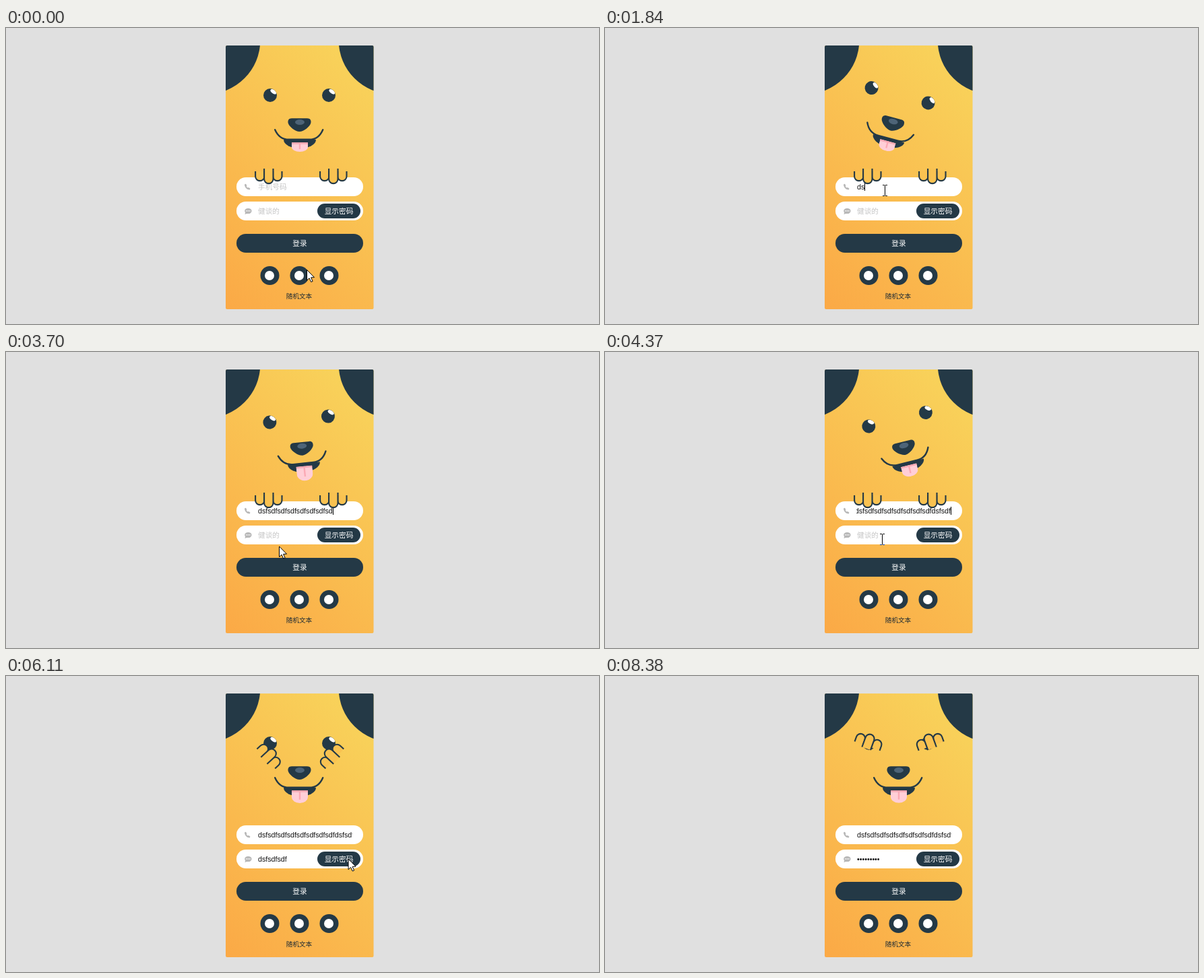
Recreate the animation shown at these times as an HTML page with a canvas. Size 880 by 440 pixels, loop 8.48 s.

```html
<!DOCTYPE html>
<html lang="zh">
<head>
<meta charset="utf-8">
<title>登录</title>
<style>
html, body { margin: 0; width: 100%; height: 100%; overflow: hidden; background: #e0e0e0; }
canvas { display: block; }
</style>
</head>
<body>
<canvas id="stage" width="880" height="440"></canvas>
<script>
const ctx = document.getElementById('stage').getContext('2d');
const LOOP = 8480;
const DARK = '#243946', FUR = '#f9c251', GREY = '#b8b8b8';
const CJK = '"Noto Sans CJK SC", "Noto Sans CJK", sans-serif';
const LATIN = '"Liberation Sans", Arial, sans-serif';
const NAME = 'dsf' + 'sdf'.repeat(7) + 'dsfsdf';
const SECRET = 'dsfsdfsdf';

// Moments of the story, in ms
const FOCUS = 1380, BLUR = 4440, REVEAL = 6040, CONCEAL = 7120;

const clamp = v => Math.max(0, Math.min(1, v));
const smooth = v => v * v * (3 - 2 * v);

// CSS "ease", cubic-bezier(.25, .1, .25, 1)
function ease(x) {
  x = clamp(x);
  if (x === 0 || x === 1) return x;
  let lo = 0, hi = 1, s = 0.5;
  for (let i = 0; i < 20; i++) {
    s = (lo + hi) / 2;
    const bx = 0.75 * s * (1 - s) * (1 - s) + 0.75 * s * s * (1 - s) + s * s * s;
    if (bx < x) lo = s; else hi = s;
  }
  return 0.3 * s * (1 - s) * (1 - s) + 3 * s * s * (1 - s) + s * s * s;
}

// Interpolates column `col` of knots whose first column is the position
function track(knots, pos, col, curve = v => v) {
  if (pos <= knots[0][0]) return knots[0][col];
  for (let i = 1; i < knots.length; i++) {
    const a = knots[i - 1], b = knots[i];
    if (pos <= b[0]) return a[col] + (b[col] - a[col]) * curve((pos - a[0]) / (b[0] - a[0]));
  }
  return knots[knots.length - 1][col];
}

const TYPING = [[1, 1700], [9, 2460], [23, 3670], [30, 4270]];
const keyTimes = Array.from(NAME, (_, i) => track(TYPING, i + 1, 1));

const PANT = [[0, 0], [1160, 2.55], [2490, 5.58], [3700, 8.37], [4930, 11], [6110, 13.73], [8380, 18.74], [8480, 18.96]];

const POINTER = [
  [60, 446.5, 359.5], [840, 405, 276], [910, 405, 270], [1160, 413, 233], [1500, 413, 233],
  [1900, 415, 242], [2900, 415, 242], [3460, 407, 285], [3700, 405.5, 289],
  [3850, 405.5, 291], [4200, 405.5, 291], [4400, 411, 277], [5500, 411, 277],
  [5900, 508, 272], [7400, 508, 272], [7850, 806, 430], [7930, 822, 462]
];

// The head turns to follow the caret: one degree per letter
function headAngle(t) {
  const step = start => ease((t - start) / 250);
  let a = 16 * step(FOCUS);
  for (const k of keyTimes) a -= step(k);
  return a + (NAME.length - 16) * step(BLUR);
}

function pawLift(t) {
  const step = start => ease((t - start) / 500);
  return step(BLUR - 10) - step(REVEAL) + step(CONCEAL);
}

function shape(color, build) {
  ctx.fillStyle = color;
  ctx.beginPath();
  build();
  ctx.fill();
}
const disc = (color, x, y, r) => shape(color, () => ctx.arc(x, y, r, 0, 7));
const pill = (color, x, y, w, h) => shape(color, () => ctx.roundRect(x, y, w, h, h / 2));
const oval = (color, x, y, rx, ry, tilt = 0) => shape(color, () => ctx.ellipse(x, y, rx, ry, tilt, 0, 7));

function line(color, width, build) {
  ctx.strokeStyle = color;
  ctx.lineWidth = width;
  ctx.beginPath();
  build();
  ctx.stroke();
}

function label(str, x, y, color, size = 10.67, font = CJK, align = 'left') {
  ctx.font = size + 'px ' + font;
  ctx.textAlign = align;
  ctx.fillStyle = color;
  ctx.fillText(str, x, y);
}

function drawCard() {
  ctx.fillStyle = '#e0e0e0';
  ctx.fillRect(0, 0, 880, 440);
  const g = ctx.createLinearGradient(283, 375, 588.6, 69);
  g.addColorStop(0, '#fba946');
  g.addColorStop(1, '#f8d65c');
  ctx.save();
  ctx.beginPath();
  ctx.roundRect(326, 26, 219.5, 392, 2);
  ctx.clip();
  ctx.fillStyle = g;
  ctx.fillRect(326, 26, 220, 392);
  disc(DARK, 297.3, 18.3, 80);
  disc(DARK, 573.7, 18.3, 80);
  ctx.restore();
}

function drawEye(x) {
  ctx.save();
  ctx.beginPath();
  ctx.arc(x, 100, 10, 0, 7);
  ctx.clip();
  ctx.fillStyle = DARK;
  ctx.fillRect(x - 11, 89, 22, 22);
  oval('#fff', x + 4.8, 94.6, 5, 2.8, 0.65);
  ctx.restore();
}

function drawTongue(h) {
  ctx.save();
  ctx.beginPath();
  ctx.moveTo(424, 170);
  ctx.lineTo(448, 170);
  ctx.lineTo(448, 170 + h * 0.5);
  ctx.ellipse(436, 170 + h * 0.5, 12, h * 0.5, 0, 0, Math.PI);
  ctx.closePath();
  ctx.clip();
  ctx.fillStyle = '#ffced7';
  ctx.fillRect(424, 170, 24, h);
  ctx.fillStyle = '#fba9b5';
  ctx.fillRect(424, 170, 24, 2.6);
  ctx.fillRect(434.8, 170, 2.4, h * 0.72);
  ctx.restore();
}

function drawFace(t) {
  ctx.save();
  ctx.translate(435.5, 108);
  ctx.rotate(headAngle(t) * Math.PI / 180);
  ctx.translate(-435.5, -108);
  drawEye(392);
  drawEye(479);
  shape(DARK, () => {
    ctx.moveTo(424, 134.2);
    ctx.lineTo(447, 134.2);
    ctx.bezierCurveTo(451.5, 134.2, 453, 137, 452.4, 141);
    ctx.bezierCurveTo(451.5, 146, 442, 154, 435.5, 154);
    ctx.bezierCurveTo(429, 154, 419.5, 146, 418.6, 141);
    ctx.bezierCurveTo(418, 137, 419.5, 134.2, 424, 134.2);
  });
  oval('#4d6478', 436, 140, 7, 4);
  shape(DARK, () => ctx.ellipse(436, 166, 24, 13, 0, 0, Math.PI));
  ctx.lineCap = 'round';
  line(DARK, 2.4, () => {
    ctx.moveTo(399.2, 151.2);
    ctx.bezierCurveTo(403, 160, 409, 165.8, 420, 165.8);
    ctx.lineTo(450, 165.8);
    ctx.bezierCurveTo(461, 165.8, 466.5, 160, 470.2, 151.2);
  });
  ctx.lineCap = 'butt';
  const pant = (1 - Math.cos(2 * Math.PI * track(PANT, t, 1))) / 2;
  drawTongue(14 + 9.2 * pant);
  ctx.restore();
}

function drawIcons() {
  ctx.lineCap = 'round';
  line(GREY, 2, () => {
    ctx.moveTo(355.2, 233.4);
    ctx.quadraticCurveTo(355.8, 239, 361, 239.2);
  });
  line(GREY, 2.6, () => {
    ctx.moveTo(355.4, 233.2);
    ctx.lineTo(356, 234.6);
    ctx.moveTo(359.6, 238.4);
    ctx.lineTo(361, 239);
  });
  ctx.lineCap = 'butt';
  oval(GREY, 359.4, 272, 5.2, 4.1);
  shape(GREY, () => {
    ctx.moveTo(355.6, 273);
    ctx.lineTo(354.4, 277);
    ctx.lineTo(359, 275.6);
  });
  for (const x of [357, 359.4, 361.8]) disc('#fff', x, 271.9, 0.8);
}

function drawInput(y, str, hint, focused) {
  ctx.save();
  ctx.beginPath();
  ctx.rect(373, y - 14, 141, 28);
  ctx.clip();
  if (str) label(str, 374, y + 4, '#111', 10.67, LATIN);
  else label(hint, 374, y + 4, '#c6c6c6');
  ctx.restore();
  if (focused) {
    const w = str ? ctx.measureText(str).width : 0;
    ctx.fillStyle = '#000';
    ctx.fillRect(Math.min(513, Math.round(374 + w)), y - 6, 1, 12);
  }
}

// Keeps the caret end of a long entry in view while it has focus
function drawName(t) {
  const focused = t >= FOCUS && t < BLUR;
  const str = NAME.slice(0, keyTimes.filter(k => k <= t).length);
  ctx.font = '10.67px ' + LATIN;
  const over = focused ? Math.max(0, ctx.measureText(str).width - 139) : 0;
  if (!over) return drawInput(236, str, '手机号码', focused);
  ctx.save();
  ctx.beginPath();
  ctx.rect(373, 222, 141, 28);
  ctx.clip();
  label(str, 374 - over, 240, '#111', 10.67, LATIN);
  ctx.fillStyle = '#000';
  ctx.fillRect(513, 230, 1, 12);
  ctx.restore();
}

function drawForm(t) {
  ctx.save();
  if (t > 4480 && t < 5450) ctx.translate(-0.6, 0);
  pill('#fff', 342, 222, 188, 28);
  pill('#fff', 342, 258, 188, 28);
  pill(DARK, 462, 261, 64, 22);
  pill(DARK, 342, 306, 188, 28);
  drawIcons();
  drawName(t);
  const count = Math.max(0, Math.min(9, Math.floor((t - 4680) / 100) + 1));
  const shown = t >= REVEAL && t < CONCEAL;
  drawInput(272, shown ? SECRET : '•'.repeat(count), '健谈的', t >= BLUR && t < REVEAL);
  label('显示密码', 494, 276, '#fff', 10.67, CJK, 'center');
  label('登录', 436, 324, '#fff', 10.67, CJK, 'center');
  ctx.restore();
  for (const x of [391.5, 435.5, 479.5]) {
    disc(DARK, x, 368, 14);
    disc('#fff', x - 0.5, 368, 7);
  }
  label('随机文本', 435, 401.8, '#1c2a33', 9.6, CJK, 'center');
}

function finger(x, top, bottom) {
  const r = 6.7;
  ctx.beginPath();
  ctx.moveTo(x - r, top);
  ctx.lineTo(x - r, bottom - r);
  ctx.arc(x, bottom - r, r, Math.PI, 0, true);
  ctx.lineTo(x + r, top);
  ctx.fillStyle = FUR;
  ctx.fill();
  ctx.strokeStyle = DARK;
  ctx.lineWidth = 2.1;
  ctx.stroke();
}

function drawPaw(x, shift, turn, lift) {
  ctx.save();
  ctx.translate(x + shift * lift, 220.5 - 123.5 * lift);
  ctx.rotate(turn * lift * Math.PI / 180);
  finger(-13, -7.5, 6.6);
  finger(13, -7.5, 6.6);
  finger(0, -11.5, 10.6);
  ctx.restore();
}

function drawArrow(x, y) {
  const pts = [[0, 0], [0, 15.6], [3.6, 12.3], [6.2, 18], [8.6, 17], [6.1, 11.4], [11, 11.2]];
  ctx.beginPath();
  for (const [dx, dy] of pts) ctx.lineTo(x + dx, y + dy);
  ctx.closePath();
  ctx.fillStyle = '#fff';
  ctx.fill();
  ctx.strokeStyle = '#000';
  ctx.lineWidth = 1;
  ctx.stroke();
}

// The text pointer inverts whatever lies below it
function drawBeam(x, y) {
  x = Math.round(x);
  y = Math.round(y);
  ctx.save();
  ctx.globalCompositeOperation = 'difference';
  ctx.fillStyle = '#fff';
  ctx.fillRect(x, y - 7, 1, 15);
  for (const row of [y - 8, y + 8]) {
    ctx.fillRect(x - 3, row, 3, 1);
    ctx.fillRect(x + 1, row, 3, 1);
  }
  ctx.restore();
}

function drawPointer(t) {
  if (t > 7930) return;
  const x = track(POINTER, t, 1, smooth), y = track(POINTER, t, 2, smooth);
  const inField = x > 342 && x < 460 && ((y > 222 && y < 250) || (y > 258 && y < 286));
  (inField ? drawBeam : drawArrow)(x, y);
}

function render(t) {
  drawCard();
  drawFace(t);
  drawForm(t);
  const lift = pawLift(t);
  drawPaw(389.8, 1.8, -160, lift);
  drawPaw(485.8, -4.2, 160, lift);
  drawPointer(t);
}

const begin = performance.now();
function tick() {
  render((performance.now() - begin) % LOOP);
  requestAnimationFrame(tick);
}
tick();
</script>
</body>
</html>
```
